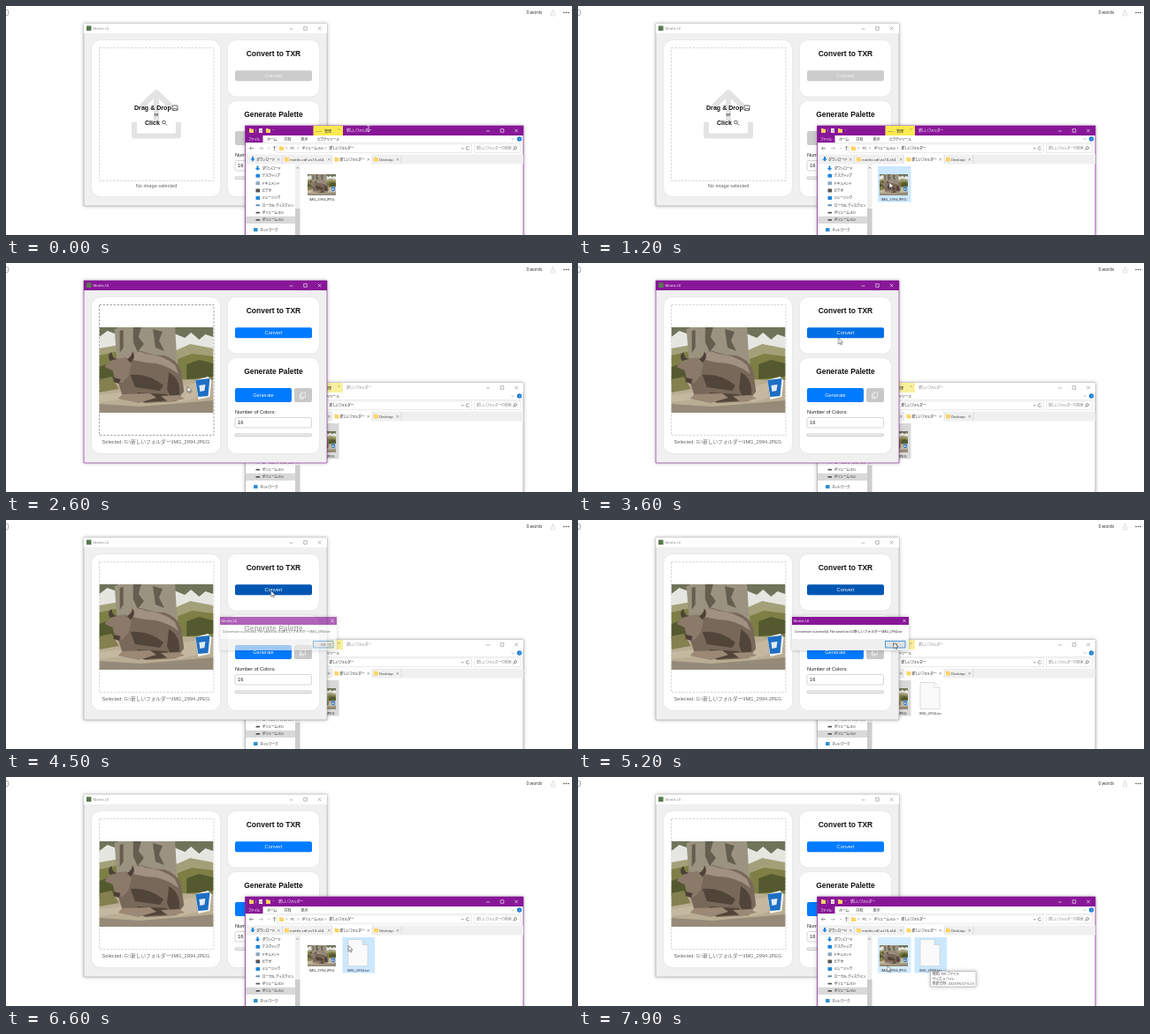
Animation, 640 px wide and 260 px high, one loop 8 s. Source, as an HTML page:

```html
<!DOCTYPE html>
<html lang="ja">
<head>
<meta charset="utf-8">
<title>Drag and convert</title>
<style>
html, body { margin: 0; width: 100%; height: 100%; overflow: hidden; background: #fff; }
svg.layer { position: absolute; left: 0; top: 0; width: 640px; height: 260px; }
text { white-space: pre; }
.ui { font: 4.1px "Open Sans", "Noto Sans CJK JP", "Noto Sans CJK", sans-serif; }
.jp { font-feature-settings: "palt"; letter-spacing: -.2px; }
.web { font: 5.65px "Liberation Sans", Arial, "Noto Sans CJK JP", "Noto Sans CJK", sans-serif; }
.head { font-size: 8.45px; font-weight: bold; }
.drop { font-size: 7.1px; font-weight: bold; }
.mid { text-anchor: middle; }
.line { fill: none; stroke: currentColor; }
.shadow { filter: drop-shadow(0 .5px 2px #0004); }

/* 1% = 80 ms */
.a { animation: 8s step-end infinite; }
#app { z-index: 2; animation-name: app-order; }
#explorer { z-index: 3; }
#top { z-index: 9; }
@keyframes app-order { 0% { z-index: 2 } 25% { z-index: 4 } 82.5% { z-index: 2 } }

.app-bar { animation-name: app-bar; }
.app-ink { animation-name: app-ink; }
.app-edge { animation-name: app-edge; }
@keyframes app-bar { 0% { fill: #fff } 25% { fill: #881798 } 55% { fill: #fff } 73.75% { fill: #881798 } 82.5% { fill: #fff } }
@keyframes app-ink { 0% { color: #888 } 25% { color: #fff } 55% { color: #888 } 73.75% { color: #fff } 82.5% { color: #888 } }
@keyframes app-edge { 0% { stroke: #aaa } 25% { stroke: #881798 } 55% { stroke: #aaa } 73.75% { stroke: #881798 } 82.5% { stroke: #aaa } }
.exp-bar { animation-name: exp-bar; }
.exp-ink { animation-name: exp-ink; }
.exp-edge { animation-name: exp-edge; }
@keyframes exp-bar { 0% { fill: #881798 } 27.5% { fill: #fff } 82.5% { fill: #881798 } }
@keyframes exp-ink { 0% { color: #fff } 27.5% { color: #888 } 82.5% { color: #fff } }
@keyframes exp-edge { 0% { stroke: #881798 } 27.5% { stroke: #aaa } 82.5% { stroke: #881798 } }

.empty { animation-name: empty; }
.loaded { animation-name: loaded; }
.media-tab { animation-name: media-tab; }
.plain-title { animation-name: plain-title; }
.result { animation-name: result; }
@keyframes empty { 0% { opacity: 1 } 28.75% { opacity: 0 } }
@keyframes loaded { 0% { opacity: 0 } 28.75% { opacity: 1 } }
@keyframes media-tab { 0% { opacity: 1 } 82.5% { opacity: 0 } }
@keyframes plain-title { 0% { opacity: 0 } 82.5% { opacity: 1 } }
@keyframes result { 0% { opacity: 0 } 58.75% { opacity: 1 } }

.tab-fill { animation-name: tab-fill; }
@keyframes tab-fill { 0% { fill: #fbe94f } 27.5% { fill: #f8f09e } }
.pick1 { animation-name: pick1; }
.pick2 { animation-name: pick2; }
@keyframes pick1 { 0% { fill: #fff } 8.75% { fill: #cce8ff } 27.5% { fill: #d9d9d9 } 82.5% { fill: #fff } 97.5% { fill: #d4ecff } }
@keyframes pick2 { 0% { fill: #fff } 82.5% { fill: #cce8ff } }
.generate { animation-name: generate; }
@keyframes generate { 0% { fill: #ccc } 28.75% { fill: #007bff } }
.convert { animation: convert 8s linear infinite; }
@keyframes convert {
  0%, 28.74% { fill: #ccc } 28.75%, 43.75% { fill: #007bff }
  47.5%, 75% { fill: #0056b3 } 78.75%, 100% { fill: #007bff }
}
.zone { animation: zone 8s linear infinite; }
@keyframes zone {
  0%, 22.5% { fill: #fff; stroke: #ccc; stroke-width: .8px; height: 151px }
  25%, 28.74% { fill: #eee; stroke: #222; stroke-width: 1.1px; height: 151px }
  28.75% { fill: #fff; stroke: #777; stroke-width: 1px; height: 148px }
  37.5%, 99.99% { fill: #fff; stroke: #ccc; stroke-width: .8px; height: 148px }
  100% { fill: #fff; stroke: #ccc; stroke-width: .8px; height: 151px }
}
.dialog { animation: dialog 8s linear infinite; }
@keyframes dialog {
  0%, 55% { opacity: 0 } 56.25% { opacity: .67 } 57.5%, 73.75% { opacity: 1 }
  75% { opacity: .45 } 76.25%, 100% { opacity: 0 }
}
.tip { animation: tip 8s linear infinite; }
@keyframes tip { 0%, 89% { opacity: 0 } 93.75%, 100% { opacity: 1 } }
.ghost { animation-name: ghost; }
@keyframes ghost { 0% { opacity: 0 } 18.75% { opacity: .6 } 25% { opacity: 0 } }
.resize { animation-name: resize; }
.arrow { animation-name: arrow; }
@keyframes resize { 0% { opacity: 1 } 1.25% { opacity: 0 } }
@keyframes arrow { 0% { opacity: 0 } 1.25% { opacity: 1 } }
.cursor { animation: cursor 8s linear infinite; }
@keyframes cursor {
  0%, 1.24% { transform: translate(410px, 139px) }
  5% { transform: translate(260px, 52px) }
  8.75% { transform: translate(354px, 201px) }
  11.25% { transform: translate(306px, 222px) }
  12.5% { transform: translate(312px, 228px) }
  15%, 17.5% { transform: translate(352px, 200px) }
  25%, 28.75% { transform: translate(186.5px, 150px) }
  32.5% { transform: translate(205px, 140px) }
  38.75% { transform: translate(282px, 98px) }
  47.5%, 57.5% { transform: translate(299.5px, 80px) }
  65%, 76.25% { transform: translate(357px, 139px) }
  85% { transform: translate(399px, 212px) }
  87.5%, 96.25% { transform: translate(396px, 211px) }
  97.5%, 100% { transform: translate(349.5px, 214px) }
}
</style>
</head>
<body>

<svg class="layer" viewBox="0 0 640 260">
  <path d="M0 4.500h1.500q1 0 1 1v4q0 1-1 1H0" fill="none" stroke="#888" stroke-width=".7"/>
  <text class="ui" x="588.500" y="9" style="font-size:4.800px" fill="#222">0 words</text>
  <path d="M616.500 7v4h4v-4M618.500 9V4.500m-1.300 1.300l1.300-1.300 1.300 1.300" fill="none" stroke="#ccc" stroke-width=".6"/>
  <g fill="#444"><circle cx="631" cy="7.500" r=".8"/><circle cx="633.500" cy="7.500" r=".8"/><circle cx="636" cy="7.500" r=".8"/></g>
</svg>

<svg class="layer a" id="app" viewBox="0 0 640 260">
  <defs>
    <symbol id="photo" viewBox="0 0 128 97" preserveAspectRatio="none">
      <path fill="#e6e6e1" d="M0 0h128v97H0z"/>
      <path fill="#a3a079" d="M0 24l22-4v20H0zM84 27l18-8 26 5v20H84z"/>
      <path fill="#7d7f45" d="M0 32l22-5v38H0zM88 36l16-6 24 3v27H88z"/>
      <path fill="#54592f" d="M0 45l14-5 8 22H0zM98 42l14-5 16 4v15l-30 3z"/>
      <path fill="#6f7359" d="M0 0h22l-5 7-8-3-9 7zM80 0h48v11l-9-3-7 6-9-8-7 6-12-5z"/>
      <path fill="#9b9380" d="M17 2l6-2h62l3 52-67 2z"/>
      <path fill="#645e50" d="M38 0h9l-3 11 6 8-7 9-5-11zM60 2l11 3-4 10 6 12-10-4zM23 4l4-1v20l-4 6z"/>
      <path fill="#b9ad93" d="M0 63l40-5 88 2v37H0z"/>
      <path fill="#84804f" d="M0 59l14-3 8 14-22 4z"/>
      <path fill="#968b79" d="M0 87l46 3 82-7v14H0z"/>
      <path fill="#c4b9a0" d="M95 66l14-3v17l-20 5zM0 77l24-3 8 7-32 4z"/>
      <path fill="#78685a" d="M29 42Q35 27 47 27q13 5 26 5 15 5 19 18l3 23-9 11-34 2-26-8-5-16z"/>
      <path fill="#a09182" d="M39 29q6-3 13 1 22 2 33 13l4 10q-16-13-37-13l-15-3z"/>
      <path fill="#514439" d="M35 54q20-2 37 12l-4 6-28-4zM78 51q13 7 12 25l-9 6-5-12zM42 74l34 2 4 7-30 2z"/>
      <path fill="#8b796a" d="M17 36l13-2 6 8-3 13-7 8-8-1-3-13-9-4 3-4z"/>
      <path fill="#4c4037" d="M12 38q-4-7 2-10 0 7 6 8zM31 36q6-2 6-9 5 8-2 13zM16 57l8 2-2 5-6-2z"/>
      <path fill="#9b8875" d="M26 76l31-1 7 5-20 6-23-5zM69 78l20-1 7 4-18 4z"/>
      <path fill="#f3f4f1" d="M108 60l14-4 4 4-2 19-13 3z"/>
      <path fill="#1d6fc4" d="M108 60l16-2-2 20-11 1z"/>
      <path fill="#e2ebf3" d="M112 66l7-1-1 7-5 1z"/>
    </symbol>
    <g id="window-buttons" class="line" stroke-width=".6">
      <path d="M-18 .5h4M-1.800 -1.800h3.600v3.600h-3.600zM14.200 -1.800l3.600 3.600m0-3.600l-3.600 3.600"/>
    </g>
    <path id="folder" fill="#fcd462" d="M0 0h2l.7.8H5V5H0z"/>
  </defs>

  <path class="shadow a app-edge" fill="#f0f0f0" stroke-width=".6" d="M88 20h275v207H88z"/>
  <path class="a app-bar" d="M88 20h275v11H88z"/>
  <path fill="#5c7850" d="M91 22.500h5.500V28H91z"/>
  <g class="a app-ink">
    <text class="ui" x="98.500" y="27" fill="currentColor">Mottle-UI</text>
    <use href="#window-buttons" x="338.500" y="25.500"/>
  </g>

  <g fill="#fff" style="filter:drop-shadow(0 .5px 1px #0001)">
    <rect x="97" y="39" width="145" height="177" rx="10"/>
    <rect x="251" y="39" width="103" height="63.500" rx="9"/>
    <rect x="251" y="108" width="103" height="108" rx="9"/>
  </g>

  <rect class="zone" x="105.500" y="47.500" width="129.500" height="151" stroke-dasharray="2.500 1.500"/>
  <g class="web">
    <g class="a empty">
      <path d="M170 132V98M153.500 114L170 98l16.500 16M145 132v15.500h50V132" fill="none" stroke="#ddd" stroke-opacity=".8" stroke-width="6" stroke-linejoin="round"/>
      <g fill="#111">
        <text class="drop" x="145" y="118">Drag &amp; Drop</text>
        <text class="mid" x="170" y="125">or</text>
        <text class="drop" x="157" y="134.500">Click</text>
      </g>
      <g fill="none" stroke="#222" stroke-width=".7">
        <rect x="188" y="113" width="6" height="5.500" rx=".7"/>
        <path d="M188.500 118l1.800-2.200 1.200 1.200 1-1 1.300 2"/>
        <circle cx="178.500" cy="132" r="1.800"/><path d="M180 133.500l2 2"/>
      </g>
      <text class="mid" x="170" y="206" fill="#666">No image selected</text>
    </g>
    <g class="a loaded">
      <use href="#photo" x="105.500" y="73" width="129" height="97"/>
      <text class="mid" x="169.500" y="205" fill="#666">Selected: G:\新しいフォルダー\IMG_2994.JPEG</text>
    </g>

    <g class="mid" fill="#111">
      <text class="head" x="302.500" y="56.700">Convert to TXR</text>
      <text class="head" x="302.500" y="125.700">Generate Palette</text>
    </g>
    <rect class="convert" x="259" y="73.200" width="87" height="12" rx="2"/>
    <rect class="a generate" x="259" y="142" width="64" height="16" rx="2"/>
    <rect x="326" y="142" width="20" height="16" rx="2" fill="#c8c8c8"/>
    <path d="M334 147h4.500v5.500H334zM332.500 148.500v5.500h4.500" fill="none" stroke="#f4f4f4" stroke-width=".8"/>
    <g class="mid" fill="#f2f2f2">
      <text x="302.500" y="81.200">Convert</text>
      <text x="291" y="152">Generate</text>
    </g>
    <text x="259" y="171" fill="#222">Number of Colors:</text>
    <rect x="259" y="175.500" width="86.500" height="11.500" rx="2" fill="#fff" stroke="#bbb" stroke-width=".6"/>
    <text x="262" y="183.300" fill="#222">16</text>
    <rect x="259" y="194" width="86.500" height="2.500" rx="1" fill="#f3f3f3" stroke="#aaa" stroke-width=".6"/>
  </g>
</svg>

<svg class="layer" id="explorer" viewBox="0 0 640 260">
  <path class="shadow a exp-edge" fill="#fff" stroke-width=".7" d="M270.500 136H585v140H270.500z"/>
  <path class="a exp-bar" d="M270.500 136H585v11H270.500z"/>
  <use href="#folder" x="275" y="139"/><use href="#folder" x="294" y="139"/>
  <path fill="#eee" d="M286 139h4v5h-4z"/><path d="M287 141.500l1 1 1.500-2" fill="none" stroke="#a33" stroke-width=".6"/>
  <path d="M282.500 139.500v4M301.500 140.500h2" stroke="#c9c" stroke-width=".5"/>
  <g class="ui jp">
    <g class="a exp-ink">
      <use href="#window-buttons" x="561" y="141.500"/>
      <text class="a media-tab" x="385" y="143" fill="currentColor">新しいフォルダー</text>
      <text class="a plain-title" x="308" y="143" fill="currentColor">新しいフォルダー</text>
    </g>
    <g class="a media-tab">
      <path class="a tab-fill" d="M347.500 136h33.500v11h-33.500z"/>
      <text x="360" y="143.500" fill="#333">管理</text>
      <path d="M350 142.500h7M375 140h3" stroke="#b3a646" stroke-width=".7"/>
      <text x="352" y="152.500" fill="#333">ピクチャツール</text>
    </g>
    <path fill="#881798" d="M270.500 147h20v8h-20z"/>
    <text x="274" y="152.500" fill="#fff">ファイル</text>
    <g fill="#333">
      <text x="295" y="152.500">ホーム</text><text x="314.500" y="152.500">共有</text><text x="333.500" y="152.500">表示</text>
    </g>
    <circle cx="580.500" cy="151" r="2.700" fill="#1b7fd4"/>
    <text class="mid" x="580.700" y="152.500" fill="#fff">?</text>
    <path d="M571.500 150.500l1.500 1.300 1.500-1.300" fill="none" stroke="#888" stroke-width=".5"/>

    <path d="M271 155.500h314M306.500 157h220v9.500h-220zM529.500 157h52v9.500h-52z" fill="none" stroke="#ddd" stroke-width=".6"/>
    <g fill="none" stroke="#555" stroke-width=".6">
      <path d="M280 161.500h-4.500m1.800-1.800l-1.800 1.800 1.800 1.800M303.500 164v-4.700m-1.800 1.800l1.800-1.800 1.800 1.800"/>
      <path stroke="#aaa" d="M286 161.500h4.500m-1.800-1.800l1.800 1.800-1.800 1.800M296 161l1 1 1-1"/>
      <path d="M515 161l1.300 1.300 1.300-1.300M523.500 160.300a1.800 1.800 0 1 0 .3 2"/>
      <circle cx="576" cy="161" r="1.500"/><path d="M575 162l-1.700 1.700"/>
    </g>
    <use href="#folder" x="309" y="159"/>
    <path d="M316.500 160l1.200 1.300-1.200 1.300M329.500 160l1.200 1.300-1.200 1.300M361 160l1.200 1.300-1.200 1.300" fill="none" stroke="#666" stroke-width=".5"/>
    <g fill="#333">
      <text x="321.500" y="163">PC</text>
      <text x="334.500" y="163">ボリューム (G:)</text>
      <text x="365.500" y="163">新しいフォルダー</text>
    </g>
    <text x="532" y="163" fill="#888">新しいフォルダーの検索</text>

    <path fill="#f0f0f0" d="M271 168.500h314v11H271z"/>
    <path fill="#fff" d="M368.500 168.500H414v11.500h-45.500z"/>
    <path d="M312.500 169v10M368.500 169v10M414 169v10M447 169v10" stroke="#ccc" stroke-width=".5"/>
    <use href="#folder" x="315" y="171.500"/><use href="#folder" x="371.500" y="171.500"/><use href="#folder" x="416" y="171.500"/>
    <g fill="#333">
      <text x="283" y="176">ダウンロード</text>
      <text x="321" y="176" style="letter-spacing:0">mottle-cdf-os10-x64</text>
      <text x="377.500" y="176">新しいフォルダー</text>
      <text x="422" y="176" style="letter-spacing:0">Desktop</text>
    </g>
    <path d="M307 173l2.500 2.500m0-2.500l-2.500 2.500M364 173l2.500 2.500m0-2.500l-2.500 2.500M408.500 173l2.500 2.500m0-2.500l-2.500 2.500M441.500 173l2.500 2.500m0-2.500l-2.500 2.500" stroke="#666" stroke-width=".5"/>

    <path fill="#d9d9d9" d="M271 238.800h56v8.200h-56z"/>
    <g id="places" fill="#333"></g>
    <path fill="#f0f0f0" d="M327 180h5.500v80H327z"/>
    <path fill="#cdcdcd" d="M327 230h5.500v30H327z"/>
    <path d="M328.300 184.500l1.400-1.400 1.400 1.400" fill="none" stroke="#555" stroke-width=".6"/>
    <path fill="#1b86dc" d="M278 171h2v2.500h1.700l-2.700 3-2.700-3h1.700zM283.500 181.500h2v2.500h1.700l-2.700 3-2.700-3h1.700z"/>
  </g>

  <g class="ui mid" fill="#222">
    <path class="a pick1" d="M339 182h37.500v40.500H339z"/>
    <use href="#photo" x="341" y="191" width="32" height="24"/>
    <text x="357" y="220.500">IMG_2994.JPEG</text>
    <g class="a result">
      <path class="a pick2" d="M380.500 182H417v40.500h-36.500z"/>
      <path d="M387 184.500h16l6 6v24h-22zM403 184.500v6h6" fill="#fafafa" stroke="#ccc" stroke-width=".6"/>
      <text x="398.500" y="220.500">IMG_2994.txr</text>
    </g>
  </g>
  <g class="tip ui jp" fill="#555">
    <path class="shadow" fill="#fff" stroke="#999" stroke-width=".5" d="M398.500 220.500h51.500V238h-51.500z"/>
    <text x="400.500" y="225.300">種類: TXR ファイル</text>
    <text x="400.500" y="230.700">サイズ: 8 バイト</text>
    <text x="400.500" y="236" style="letter-spacing:-.1px">更新日時: 2023/05/27 6:23</text>
  </g>
</svg>

<svg class="layer" id="top" viewBox="0 0 640 260">
  <g class="dialog ui">
    <path class="shadow" fill="#fff" d="M242 110h132v38H242z"/>
    <path fill="#881798" d="M242 110h132v9H242z"/>
    <path fill="#f0f0f0" d="M242 135h132v13H242z"/>
    <text x="243.500" y="116" fill="#fff">Mottle-UI</text>
    <path d="M367.300 112.700l3.400 3.400m0-3.400l-3.400 3.400" stroke="#fff" stroke-width=".6"/>
    <text x="245" y="128" style="font-size:3.900px;letter-spacing:-.1px" fill="#222">Conversion successful. File saved as G:\新しいフォルダー\IMG_2994.txr</text>
    <path fill="#e1e1e1" stroke="#0078d7" stroke-width=".7" d="M347.500 137.500H370v7.500h-22.500z"/>
    <text class="mid" x="358.700" y="142.800" fill="#222">OK</text>
  </g>
  <g class="cursor">
    <use class="a ghost" href="#photo" x="-16" y="-20" width="32" height="24"/>
    <path class="a resize" d="M0-4v8M-1.500-2.500L0-4l1.500 1.500M-1.500 2.500L0 4l1.500-1.500" fill="none" stroke="#ddd" stroke-width=".8"/>
    <path class="a arrow" d="M0 0v7l1.700-1.500 1.100 2.400 1-.5-1.100-2.300H5z" fill="#fff" stroke="#222" stroke-width=".5"/>
  </g>
</svg>

<script>
const places = [
  ["ダウンロード"], ["デスクトップ", "#1b86dc"], ["ドキュメント", "#8fa9bd"], ["ビデオ", "#555"], ["ミュージック", "#1b86dc"],
  ["ローカル ディスク (C:)", "#5b8fb5"], ["ボリューム (D:)", "#555"], ["ボリューム (G:)", "#555"]
];
const row = (label, color, x, y, h) =>
  (color ? `<rect x="${x - 7}" y="${y - h / 2}" width="4.6" height="${h}" rx=".6" fill="${color}"/>` : "") +
  `<text x="${x}" y="${y + 1.5}">${label}</text>`;
document.getElementById("places").innerHTML =
  places.map(([label, color], i) => row(label, color, 289.5, 184.5 + i * 8.35, i > 4 ? 1.8 : 4)).join("") +
  row("ネットワーク", "#2f8fce", 287, 254, 4);
</script>
</body>
</html>
```
